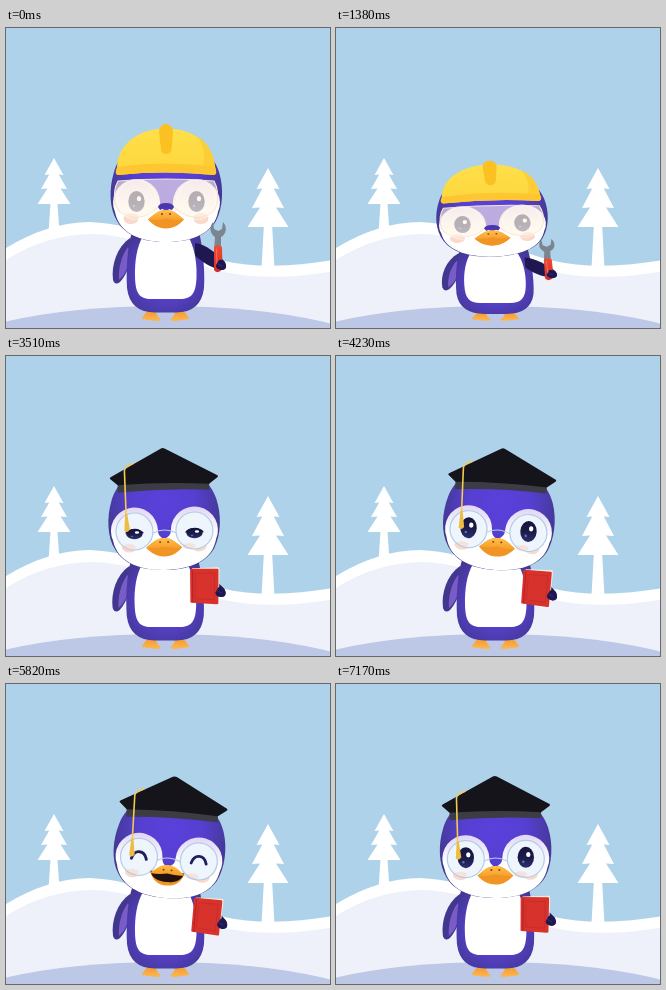
Write an HTML page with a canvas that moves like this. It is 324x300 px and loops after 7200 ms.

```html
<!DOCTYPE html>
<html lang="en">
<head>
<meta charset="utf-8">
<title>Penguin</title>
<style>
html, body { margin: 0; width: 100%; height: 100%; overflow: hidden; background: #aed2ea; }
canvas { display: block; width: 324px; height: 300px; }
</style>
</head>
<body>
<canvas id="stage"></canvas>
<script>
const LOOP = 7200, SWING = 1800, SWAP = 1520, GROUND = 292;
const LENSES = [130.5, 190.5];
const canvas = document.getElementById('stage');
const ctx = canvas.getContext('2d');
const ratio = window.devicePixelRatio || 1;
canvas.width = 324 * ratio;
canvas.height = 300 * ratio;

const clamp = v => Math.max(0, Math.min(1, v));
const ease = v => { v = clamp(v); return v * v * (3 - 2 * v); };

function fill(path, color) {
  ctx.fillStyle = color;
  ctx.fill(new Path2D(path));
}
function line(path, color, width) {
  ctx.strokeStyle = color;
  ctx.lineWidth = width;
  ctx.lineCap = ctx.lineJoin = 'round';
  ctx.stroke(new Path2D(path));
}
function oval(x, y, rx, ry, color) {
  ctx.fillStyle = color;
  ctx.beginPath();
  ctx.ellipse(x, y, rx, ry, 0, 0, 2 * Math.PI);
  ctx.fill();
}
function ring(x, y, r, color, width) {
  ctx.strokeStyle = color;
  ctx.lineWidth = width;
  ctx.beginPath();
  ctx.arc(x, y, r, 0, 2 * Math.PI);
  ctx.stroke();
}
function blend(g, colors) {
  colors.forEach((c, i) => g.addColorStop(i / (colors.length - 1), c));
  return g;
}
const vertical = (y0, y1, ...colors) => blend(ctx.createLinearGradient(0, y0, 0, y1), colors);
const radial = (x, y, r, ...colors) => blend(ctx.createRadialGradient(x, y, 0, x, y, r), colors);

function group(draw) {
  ctx.save();
  draw();
  ctx.restore();
}
function turnAt(x, y, angle) {
  ctx.translate(x, y);
  ctx.rotate(angle);
  ctx.translate(-x, -y);
}

// motion
function sway(t) {
  const amount = 0.6 + 0.4 * ease((t - SWAP) / 500);
  return amount * Math.sin(2 * Math.PI * t / SWING);
}
function stretch(t) {
  const keys = [[1130, 1], [1400, 0.81], [1660, 1.05], [1880, 0.99], [2060, 1]];
  let k = 1;
  for (let i = 1; i < keys.length; i++) {
    const [t0, a] = keys[i - 1], [t1, b] = keys[i];
    if (t >= t0) k = a + (b - a) * ease((t - t0) / (t1 - t0));
  }
  return k;
}
const lidOpening = t => 1 - 0.5 * (1 - ease(Math.abs(t - 3510) / 130));
const isHappy = t => t > 4250 && t < 6450;

// scenery
function tree(x, top, tiers, foot, base) {
  let right = '', left = '';
  tiers.forEach(([w, y], i) => {
    right += `L${x + w} ${y}`;
    left = `L${x - w} ${y}` + left;
    if (i < tiers.length - 1) {
      right += `L${x + w * 0.5} ${y - 0.5}`;
      left = `L${x - w * 0.5} ${y - 0.5}` + left;
    }
  });
  const trunk = tiers[2][1];
  fill(`M${x} ${top}${right}L${x + foot * 0.65} ${trunk}L${x + foot} ${base}L${x - foot} ${base}L${x - foot * 0.65} ${trunk}${left}Z`, '#fff');
}
function scenery() {
  ctx.fillStyle = '#aed2ea';
  ctx.fillRect(0, 0, 324, 300);
  tree(48, 130, [[9.5, 147], [13, 161], [16.5, 176]], 5.5, 205);
  tree(262, 140, [[11.5, 161], [16, 180], [20.5, 199]], 6.5, 240);
  fill('M0 220C28 203 56 194 84 194C136 196 170 221 214 232C252 241 290 238 324 232.500V300H0Z', '#fff');
  fill('M0 232C28 214 58 206 88 206C138 208 172 232 214 243C252 252 290 249 324 244V300H0Z', '#eef1fa');
  oval(158, 331, 224, 53, '#bcc8e6');
}

// body parts
function foot(x, side) {
  group(() => {
    ctx.translate(x, 0);
    ctx.scale(side, 1);
    fill('M-4 282H4L9 288.500Q11.500 291 8 291.500L-4 293Q-9 293.500 -8 290.500Q-4 288 -4 282Z', vertical(283, 293, '#f59a34', '#fdb850'));
  });
}
function body(s) {
  foot(146, -1);
  foot(173, 1);
  group(() => {
    const lean = -2.5 * Math.max(0, -s);
    ctx.transform(1, 0, -lean / 75, 1, lean * 284 / 75, 0);
    fill('M124 210C111 219 105 237 107 252Q109 258 114 254C122 245 126 232 127 217Z', '#41378e');
    fill('M122 219C115 228 112 242 113 252C121 245 125 233 124 222Z', '#7a5cc8');
    fill('M126 204H193C197 220 199 243 198 260Q195 284.500 170 284.500H149Q124 284.500 121 260C120 243 121 220 126 204Z',
      radial(160, 246, 52, '#5a40d0', '#5540c4', '#413690'));
    fill('M137 208H182C188 218 191 233 190.500 249C190 265 186 271 174 271H145C133 271 129.500 265 129 249C128.500 233 131 218 137 208Z', '#fff');
  });
}

function wrench() {
  fill('M207 194C203 199 204 206 209 209L208 222H215L215 209C221 206 221 198 217 194L216 201L212 203L208 201Z', '#7b858f');
  fill('M208 219Q212 215 216 219L216.500 241Q212 247 208 242Z', vertical(217, 245, '#ef4c38', '#d32c27'));
  line('M210.500 221L211 239', '#f4725d', 1);
}
function book() {
  fill('M187 212.500L214 212L214.500 215L213 247L187 246Z', '#fbeedd');
  fill('M186 213L212.500 213.500Q213.500 213.500 213.400 215L212.500 248Q212.500 249 211 249L185.500 247Q184.500 247 184.600 246L185 214Z', '#d8322d');
  line('M187.500 215L187 246', '#b82425', 1.2);
  line('M190.500 217.500L209.500 217.800L208.500 244.500L190 243Z', '#c5292a', 0.7);
}
function arm(s, hat) {
  group(() => {
    if (hat) {
      turnAt(190, 222, 0.1 * s);
    } else {
      ctx.translate(0, 1.4 * s);
      turnAt(195, 255, 0.075 * s);
    }
    fill('M189 215C199 216 212 226 219 234Q222 241 216 242C205 240 194 233 189 227Z', '#1f1850');
    hat ? wrench() : book();
    fill('M213 232Q218 231 220 237Q221 242 215 242Q209 241 210 237Z', '#1f1750');
    line('M212 236L216 238', '#3c3088', 0.8);
  });
}

function eye(x, y, open, happy) {
  if (happy) {
    line(`M${x - 7.5} ${y + 3.5}C${x - 5} ${y - 6} ${x + 5} ${y - 6} ${x + 7.5} ${y + 3.5}`, '#241d5c', 2.9);
    return;
  }
  group(() => {
    ctx.translate(x, y + 8 * (1 - open));
    ctx.scale(1, open);
    oval(0, 0, 8.2, 10.5, vertical(-10, 10, '#17153f', '#1b1a48', '#2a2f6c'));
    oval(2.5, -2.8, 2.2, 2.6, '#fff');
    oval(-2.5, 4.5, 1.3, 1.3, '#5f6cad');
    if (open < 0.95) line('M-8.300 -2C-5 -11 5 -11 8.300 -2', '#17153f', 2);
  });
}
function beak(happy) {
  if (happy) {
    fill('M143 189Q160 186 177 189C174 198 168 201.500 160 201.500C152 201.500 146 198 143 189Z', '#ee9527');
    fill('M143 188H177C175 195.500 168 198 160 198C152 198 145 195.500 143 188Z', '#21120f');
    fill('M142 190C148 187 151 181 160 181C169 181 172 187 178 190Q169 191.500 160 189.500Q151 191.500 142 190Z', vertical(181, 191, '#ffbd45', '#f39a25'));
  } else {
    fill('M142 191.500C148 187 152 182 160 182C168 182 172 187 178 191.500C173 197 168 200.500 160 200.500C152 200.500 147 197 142 191.500Z', '#f09424');
    fill('M142 191.500C148 187 152 182 160 182C168 182 172 187 178 191.500Q169 193 160 190.500Q151 193 142 191.500Z', vertical(182, 193, '#ffc04a', '#f69d28'));
  }
  oval(156, 186, 1, 0.9, '#7c3c10');
  oval(164, 186, 1, 0.9, '#7c3c10');
}
function skull() {
  fill('M160 112C190 112 207 124 213 144C218 160 217 180 210 193C201 208 183 214 160 214C137 214 120 208 111 193C103 180 103 160 108 144C114 124 131 112 160 112Z',
    radial(160, 146, 64, '#5b40dc', '#553fd0', '#413889'));
  fill('M160 183C156 181 154 179 154 174A23.500 23.500 0 1 0 109 184C113 205 134 214 160 214C187 214 208 205 212 184A23.500 23.500 0 1 0 167 174C167 179 164 181 160 183Z',
    vertical(151, 180, '#e2d6f5', '#ffffff'));
  oval(125, 190.500, 7.5, 5.5, '#fbd8cc');
  oval(195, 190.500, 7.5, 5.5, '#fbd8cc');
}

function glasses() {
  for (const x of LENSES) {
    oval(x, 175, 18.5, 18.5, '#eef5fc');
    oval(x - 5.5, 190.5, 6.5, 3, 'rgba(251,216,204,.7)');
    ring(x, 175, 18.5, '#b3cde6', 1.2);
  }
  line('M149 177Q160 171 172 177', '#b3cde6', 1);
}
function goggles() {
  const frame = 'M112 153Q160 149 208 153Q213 162 211 175Q208 189 190 189C178 189 174 183 169 180Q160 177 151 180C146 184 142 189 130 189Q112 188 109 175Q107 162 112 153Z';
  fill(frame, 'rgba(255,244,230,.6)');
  line(frame, '#f5e5d2', 1.2);
  for (const x of LENSES) {
    oval(x, 172, 21, 18, 'rgba(255,249,236,.2)');
    ring(x, 172, 19.5, 'rgba(255,252,240,.6)', 1.2);
  }
  fill('M152 179Q153 175 160 175Q167 175 168 179L166 182Q160 179 154 182Z', '#4a37ae');
}
function helmet() {
  fill('M111 141C111 116 133 100.500 160 100.500C187 100.500 209 116 209 141Q211 146 208 147Q160 142 112 147Q109 146 111 141Z', vertical(101, 147, '#ffdf4a', '#fdd63c'));
  fill('M191 108C204 116 209 129 210 146Q203 144 196 143C200 129 198 117 191 108Z', '#fdcd35');
  fill('M111 139Q160 132 209 139Q212 146 208 147Q160 142 112 147Q108 146 111 139Z', '#fec731');
  fill('M153 103Q154 96 160 96Q166 96 167 103L165.500 122Q164 126 160 126Q156 126 155 122Z', '#fbc022');
}
function cap() {
  fill('M114.500 124H206V134.500Q160 132 114.500 136Z', '#3c3c44');
  fill('M107 122Q106 121 108 120L158 92.600Q160 91.500 162 92.600L214 120Q216 121 214 122.500L206 128.500Q160 125.500 114.500 128.500Z', '#15141a');
  line('M130 107Q121.500 110 121.500 114L122.500 160', '#f4ca52', 1.6);
  fill('M121.500 157H123.500L126 173Q123.500 177 120.500 174Z', '#edbc40');
}
function head(t, s, hat) {
  group(() => {
    ctx.translate(-5 * Math.max(0, -s), 0);
    turnAt(160, 206, s * (s > 0 ? 4.5 : 3.2) * Math.PI / 180);
    const happy = isHappy(t), open = lidOpening(t);
    skull();
    if (!hat) glasses();
    eye(130.5, 173.5, open, happy);
    eye(190.5, 173.5, open, happy);
    if (hat) goggles();
    beak(happy);
    hat ? helmet() : cap();
  });
}

function render(t) {
  ctx.setTransform(ratio, 0, 0, ratio, 0, 0);
  scenery();
  const s = sway(t), hat = t < SWAP;
  group(() => {
    ctx.translate(0, GROUND);
    ctx.scale(1, stretch(t));
    ctx.translate(0, -GROUND);
    body(s);
    head(t, s, hat);
    arm(s, hat);
  });
}

const start = performance.now();
function tick(now) {
  render(Math.max(0, now - start) % LOOP);
  requestAnimationFrame(tick);
}
render(0);
requestAnimationFrame(tick);
</script>
</body>
</html>
```
